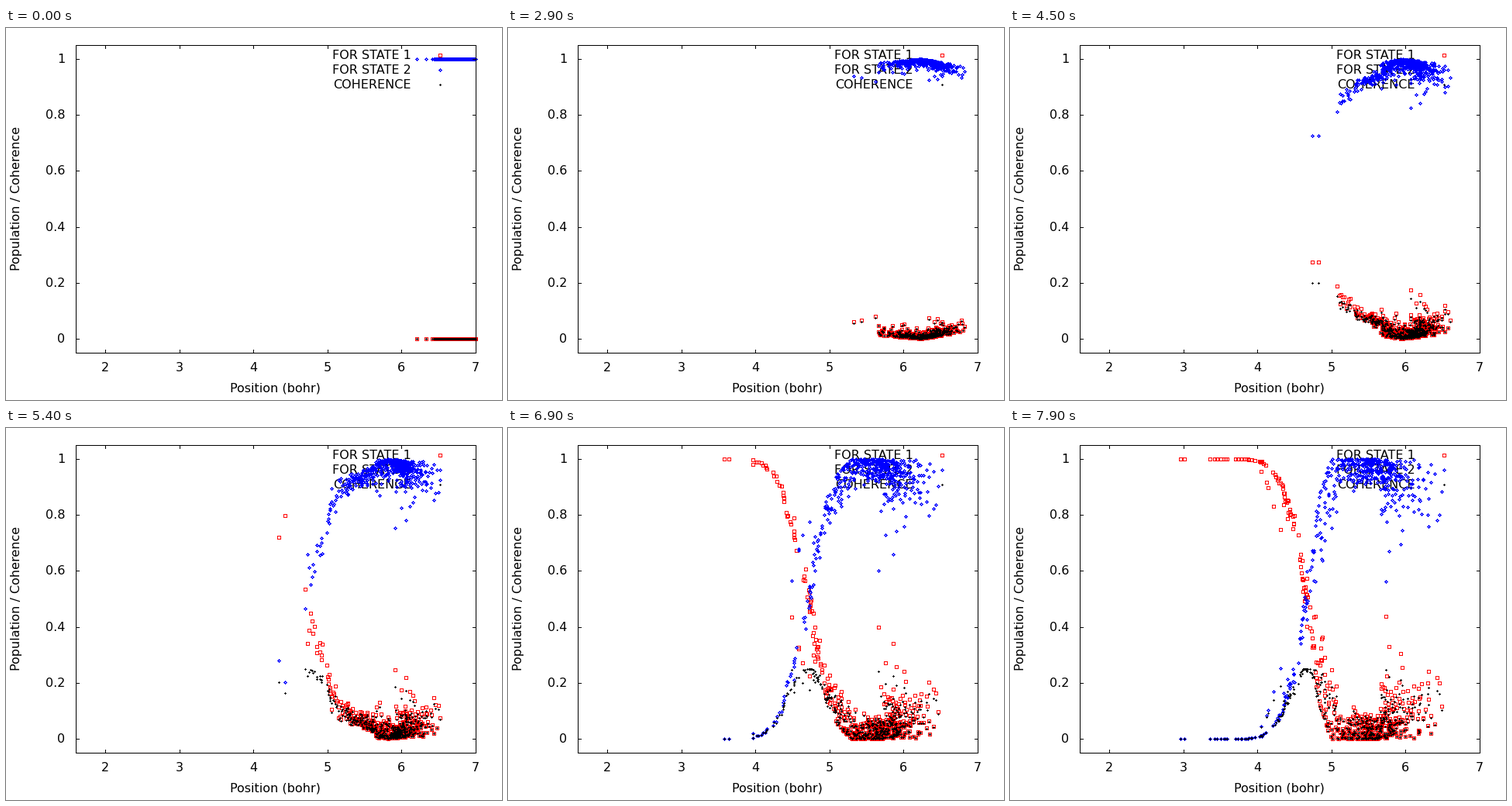
A matplotlib script that plays this animation: 640 by 480 pixels, repeating every 8 s.

```python
import matplotlib.pyplot as plt
import numpy as np
from matplotlib.animation import FuncAnimation

W, H, DPI = 640, 480, 100
FRAMES, STEP = 80, 100
LEFT, RIGHT, TOP, BOTTOM = 90, 606, 22, 419
RED, BLUE, BLACK = (255, 0, 0), (0, 0, 255), (0, 0, 0)
N = 500
CROSSING, STEP_X = 4.72, 5.65

# Every trajectory keeps its rank in the packet: -1 front, 0 middle, 1 tail.
rng = np.random.default_rng(12)
rank = np.clip(rng.normal(0, 1 / 2.6, N), -0.95, 0.95)
drift = rng.normal(0, 0.012, N)
noise = rng.normal(0, 1, N)
blend = rng.random(N) ** 2
stray = rng.random(N) < 0.03
lag = np.ones(N)

# Two fast trajectories run ahead of the packet.
lag[:2] = 0.57, 0.72
noise[:2], blend[:2], stray[:2] = 0, 1, False
rank[2:4], drift[2:4] = (-1, 1), 0


def middle(t):
    return 6.75 - 0.165 * t


def positions(t):
    mid = middle(t)
    front = 6.41 - 0.255 * t - 0.0021 * t**3
    tail = 6.47 + 0.021 * (t - 7) ** 2
    s = np.clip(rank + drift * (t - 4), -1, 1)
    x = mid + np.where(s < 0, s * (mid - front), s * (tail - mid))
    x[0] = 6.20 - 0.285 * t - 0.002 * t**3
    x[1] = x[0] + 0.13 - 0.01 * t
    return x


def log_odds(x):
    u = CROSSING - x
    return np.where(u > 0, 4.9 * u + 4 * u**3, 2.7 * np.tanh(1.8 * u))


def population(x, t):
    """Population of state 1 for every trajectory."""
    d = x - middle(t) + 0.03
    slope = np.where(d < 0, 0.004 * t**2, min(0.025 * t, 0.1))
    spread = min(0.15 * t, 0.95)
    outer = slope * np.abs(d) * (1 - spread + 3 * spread * blend)
    outer += 0.0006 * t**2 * noise**2

    odds = log_odds(x) + 0.12 * noise - 1.4 * stray * np.clip(t - 5, 0, 1)
    share = max(t - 3.5, 0) / 3 * np.clip(1.3 + 1.5 * d, 0, 1)
    inner = (1 - np.clip(share, 0, 1) * (1 - blend)) / (1 + np.exp(-odds))
    inner *= np.minimum(lag + 0.27 * max(t - 4.5, 0), 1)
    return np.clip(np.where(x < STEP_X, inner, outer), 0, 1)


def to_px(x):
    return LEFT + (x - 1.6) / 5.4 * (RIGHT - LEFT)


def to_py(y):
    return BOTTOM - (y + 0.05) / 1.1 * (BOTTOM - TOP)


# Marker shapes on a 5 x 5 pixel cell.
dy, dx = np.mgrid[-2:3, -2:3]
dist = np.abs(dx) + np.abs(dy)


def offsets(mask):
    return dx[mask], dy[mask]


SQUARE = offsets(np.maximum(np.abs(dx), np.abs(dy)) == 2)
DIAMOND = offsets((dist == 1) | (dist == 2))
DOT = offsets(dist <= 1)

KEY = [("FOR STATE 1", 35), ("FOR STATE 2", 54), ("COHERENCE", 73)]
STYLES = [(SQUARE, RED), (DIAMOND, BLUE), (DOT, BLACK)]


def stamp(img, px, py, shape, color):
    cols = np.rint(px).astype(int)[:, None] + shape[0]
    rows = np.rint(py).astype(int)[:, None] + shape[1]
    img[rows, cols] = (*color, 255)


def render(t):
    img = np.zeros((H, W, 4), np.uint8)
    x = positions(t)
    p = population(x, t)
    seen = x <= 7
    px, p = to_px(x[seen]), p[seen]
    for y, style, (_, key_y) in zip((p, 1 - p, p * (1 - p)), STYLES, KEY):
        stamp(img, np.r_[px, 560], np.r_[to_py(y), key_y], *style)
    return img


plt.rcParams["font.family"] = "DejaVu Sans"
fig = plt.figure(figsize=(W / DPI, H / DPI), dpi=DPI, facecolor="white")
ax = fig.add_axes([0, 0, 1, 1])
ax.axis("off")


def line(xs, ys):
    ax.plot(xs, ys, color="black", lw=72 / DPI, antialiased=False,
            solid_capstyle="projecting", zorder=3)


def label(x, y, text, ha="center", **kw):
    ax.text(x, y, text, ha=ha, va="baseline", size=16 * 72 / DPI,
            color="black", zorder=1, **kw)


line([LEFT, RIGHT, RIGHT, LEFT, LEFT], [TOP, TOP, BOTTOM, BOTTOM, TOP])
for v in range(2, 8):
    x = round(to_px(v))
    line([x, x], [BOTTOM, BOTTOM - 4])
    line([x, x], [TOP, TOP + 4])
    label(x, 443, str(v))
for k in range(6):
    y = round(to_py(k / 5))
    line([LEFT, LEFT + 4], [y, y])
    line([RIGHT, RIGHT - 4], [y, y])
    label(76, y + 5, f"{k / 5:g}", ha="right")

label(347, 470, "Position (bohr)")
label(18.5, 220, "Population / Coherence", rotation=90,
      rotation_mode="anchor")
for name, y in KEY:
    label(523, y + 5, name, ha="right")

layer = ax.imshow(render(0), extent=(0, W, H, 0), interpolation="nearest",
                  aspect="auto", zorder=2)
ax.set_xlim(0, W)
ax.set_ylim(H, 0)


def update(i):
    layer.set_data(render(i * STEP / 1000))
    return [layer]


anim = FuncAnimation(fig, update, frames=FRAMES, interval=STEP, repeat=True,
                     repeat_delay=0)
plt.show()
```
